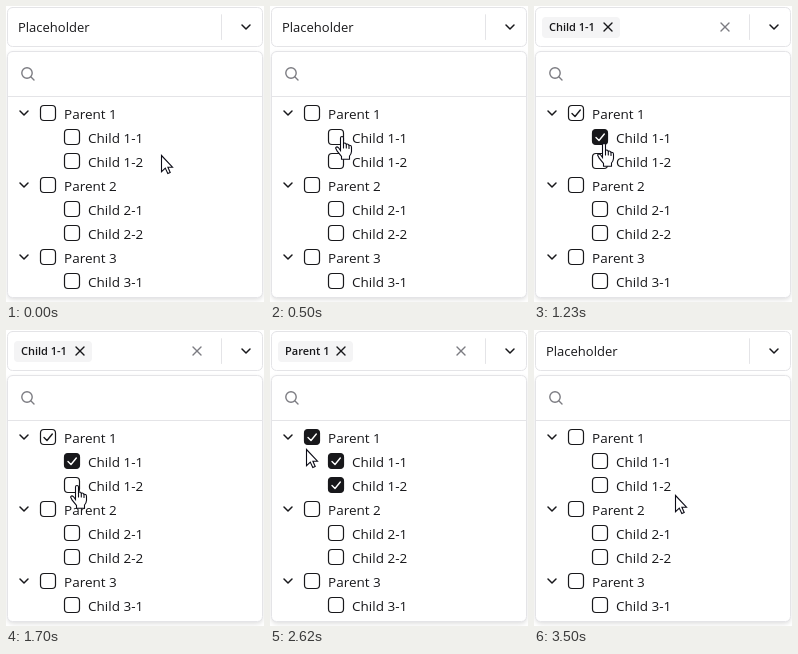
Write an HTML page with a canvas that moves like this. It is 258x296 px and loops after 3.53 s.

```html
<!DOCTYPE html>
<html lang="en">
<head>
<meta charset="utf-8">
<title>Tree select</title>
<style>
  html, body { margin: 0; width: 100%; height: 100%; overflow: hidden; background: #fff; }
  canvas { display: block; }
</style>
</head>
<body>
<canvas id="stage" width="258" height="296"></canvas>
<script>
const ctx = document.getElementById('stage').getContext('2d');
const LOOP = 3530;
const INK = '#18181b', GRAY = '#7c7c82', LINE = '#e4e4e7';
const FONT = '"Open Sans", "Noto Sans", sans-serif';

// Clicks: first child, second child, parent
const CLICKS = [1050, 2200, 3240];

const ROWS = ['Parent 1', 'Child 1-1', 'Child 1-2', 'Parent 2', 'Child 2-1', 'Child 2-2', 'Parent 3', 'Child 3-1']
  .map((label, i) => {
    const parent = label.startsWith('Parent');
    return { label, parent, x: parent ? 34 : 58, y: 107 + 24 * i, end: parent ? 111 : 140 };
  });

// Pointer hotspot: time, x, y
const PATH = [
  [0, 155, 149], [30, 153, 148], [90, 142, 142], [200, 110, 124], [310, 87, 113],
  [400, 76, 120], [500, 71, 130], [570, 70, 132], [700, 70, 136], [870, 70, 136],
  [1000, 69, 137], [1300, 69, 137], [1420, 69, 142], [1550, 70, 150], [1700, 70, 155],
  [2380, 70, 155], [2500, 54, 138], [2620, 36, 119], [2720, 30, 113], [2820, 36, 110],
  [2910, 41, 108], [3070, 42, 107], [3240, 42, 107], [3320, 72, 126], [3420, 118, 153],
  [3500, 141, 165], [LOOP, 141, 165]
];

function pointerAt(t) {
  const i = PATH.findIndex(k => k[0] > t);
  const a = PATH[i - 1], b = PATH[i];
  const p = (t - a[0]) / (b[0] - a[0]);
  return [1, 2].map(n => Math.round(a[n] + (b[n] - a[n]) * p));
}

function stroke(points, color, width) {
  ctx.beginPath();
  points.forEach(([x, y]) => ctx.lineTo(x, y));
  ctx.strokeStyle = color;
  ctx.lineWidth = width;
  ctx.lineCap = ctx.lineJoin = 'round';
  ctx.stroke();
}

function box(x, y, w, h, r, fill, line, width = 1) {
  ctx.beginPath();
  ctx.roundRect(x, y, w, h, r);
  ctx.fillStyle = fill;
  ctx.fill();
  if (!line) return;
  ctx.strokeStyle = line;
  ctx.lineWidth = width;
  ctx.stroke();
}

function text(str, x, y, size, weight = 400) {
  ctx.font = `${weight} ${size}px ${FONT}`;
  ctx.fillStyle = INK;
  ctx.fillText(str, x, y);
}

const chevron = (x, y) => stroke([[x - 4, y - 2], [x, y + 2], [x + 4, y - 2]], INK, 1.5);

function cross(x, y, color) {
  stroke([[x - 4, y - 4], [x + 4, y + 4]], color, 1.4);
  stroke([[x + 4, y - 4], [x - 4, y + 4]], color, 1.4);
}

function drawControl(chip) {
  box(1.5, 1.5, 255, 39, 5, '#fff', LINE);
  stroke([[215.5, 8.5], [215.5, 33.5]], LINE, 1);
  chevron(240, 21);
  if (!chip) return text('Placeholder', 12, 26, 13);
  box(8, 11, chip.cross + 4, 21, 4, '#f4f4f5');
  text(chip.label, 15, 25, 11, 600);
  cross(chip.cross, 21, INK);
  cross(191, 21, GRAY);
}

function drawPanel() {
  ctx.save();
  ctx.shadowColor = 'rgba(0,0,0,.14)';
  ctx.shadowBlur = 5;
  ctx.shadowOffsetY = 2;
  box(1.5, 45.5, 255, 246, 5, '#fff');
  ctx.restore();
  box(1.5, 45.5, 255, 246, 5, '#fff', LINE);
  stroke([[2, 90.5], [256, 90.5]], LINE, 1);
  ctx.beginPath();
  ctx.arc(21, 67, 5.2, 0, Math.PI * 2);
  ctx.strokeStyle = GRAY;
  ctx.lineWidth = 1.4;
  ctx.stroke();
  stroke([[25, 71], [28, 74]], GRAY, 1.4);
}

function drawRow({ label, parent, x, y }, state) {
  if (parent) chevron(18, y);
  box(x + 0.5, y - 7.5, 15, 15, 3.5, state === 'on' ? INK : '#fff', INK, 1.2);
  if (state) {
    stroke([[x + 4, y + 0.5], [x + 7, y + 3.5], [x + 12.3, y - 3]], state === 'on' ? '#fff' : INK, 1.4);
  }
  text(label, x + 24, y + 5.5, 13.5);
}

const ARROW = new Path2D('M.5 .5V16.7L4.3 13.1L6.8 18.5L9.2 17.5L6.9 12.2H11.5Z');
const HAND = new Path2D('M5.5 14.5V2Q5.5 .5 7 .5Q8.5 .5 8.5 2V7.5Q10 6.2 11.3 8.2Q13 7.4 14 9.2' +
  'Q16.5 9 16.5 11.5V15.5Q16.3 18 14.5 20V23.2H6.5V20.5L2.2 15.2L.6 12Q1.6 9.9 3.6 11.8Z');
const FINGERS = new Path2D('M8.5 7.5V12M11.3 8.2V12M14 9.2V12.5');

function drawPointer([x, y]) {
  const over = ROWS.some(r => x >= r.x && x < r.end && Math.abs(y - r.y) < 12);
  const shape = over ? HAND : ARROW;
  ctx.save();
  ctx.translate(over ? x - 6 : x, y);
  ctx.fillStyle = '#fff';
  ctx.strokeStyle = '#0b0b16';
  ctx.lineWidth = 1.1;
  ctx.lineJoin = 'miter';
  ctx.fill(shape);
  ctx.stroke(shape);
  if (over) ctx.stroke(FINGERS);
  ctx.restore();
}

const VIEWS = [
  { chip: null, states: [] },
  { chip: { label: 'Child 1-1', cross: 74 }, states: ['part', 'on'] },
  { chip: { label: 'Parent 1', cross: 71 }, states: ['on', 'on', 'on'] }
];

function draw(now) {
  const t = now % LOOP;
  const view = VIEWS[CLICKS.filter(c => t >= c).length % VIEWS.length];
  ctx.fillStyle = '#fff';
  ctx.fillRect(0, 0, 258, 296);
  drawControl(view.chip);
  drawPanel();
  ROWS.forEach((row, i) => drawRow(row, view.states[i]));
  drawPointer(pointerAt(t));
}

const start = performance.now();
function tick() {
  draw(performance.now() - start);
  requestAnimationFrame(tick);
}
tick();
</script>
</body>
</html>
```
